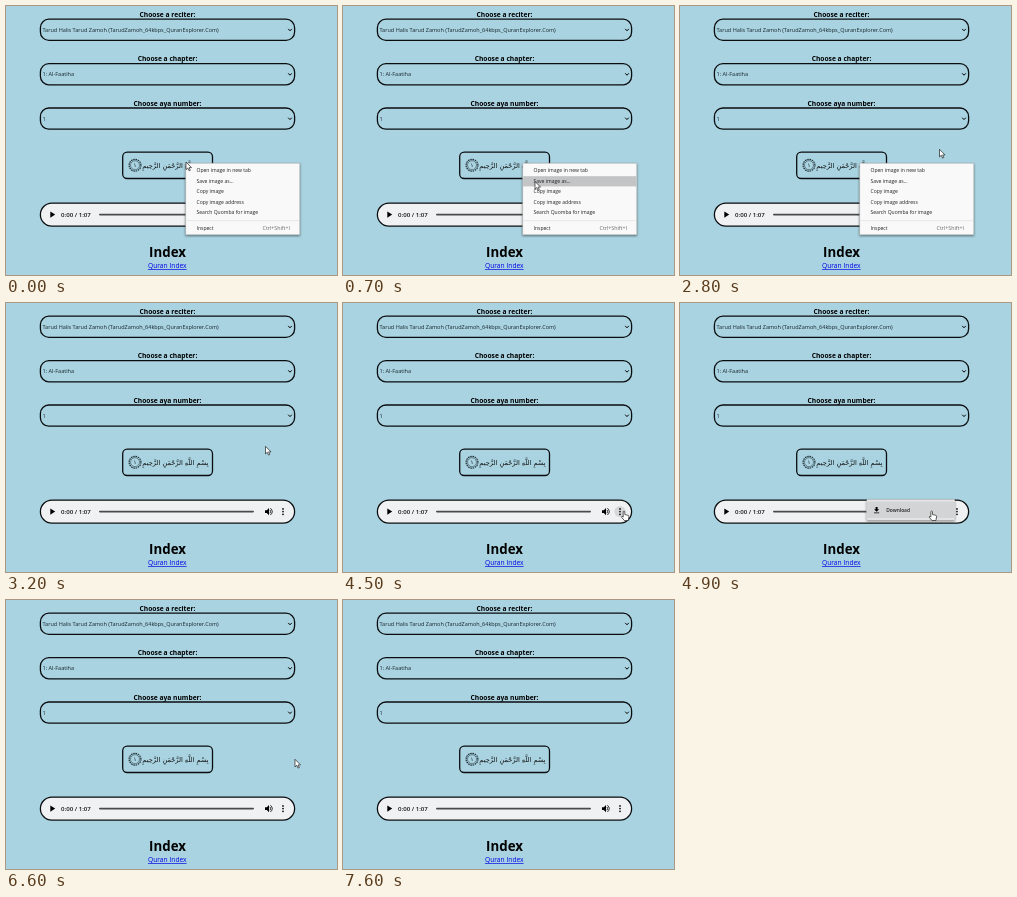
An HTML page that plays this animation: 331 by 269 pixels, repeating every 7.8 s.

```html
<!DOCTYPE html>
<html lang="en">
<head>
<meta charset="utf-8">
<title>Verse player</title>
<style>
  html, body { margin: 0; width: 100%; height: 100%; overflow: hidden; background: #a9d3e1; }
  svg { display: block; width: 100vw; height: 100vh; font-family: "Open Sans", "Noto Sans", sans-serif; }
  text { fill: #111; }
  .box { fill: none; stroke: #0a0d0f; stroke-width: 1.3; }
  .label { font-size: 6.7px; font-weight: 700; text-anchor: middle; fill: #000; }
  .value { font-size: 5.53px; fill: #17252b; }
  .title { font-size: 13.3px; font-weight: 700; text-anchor: middle; fill: #000; }
  .link { font-size: 6.7px; text-anchor: middle; fill: #0000e4; text-decoration: underline; }
  .verse { font: 6.6px "DejaVu Sans", sans-serif; text-anchor: middle; }
  .clock { font-size: 6.1px; font-weight: 600; }
  .item { font-size: 5.05px; fill: #222; }
  .keys { font-size: 5.3px; text-anchor: end; fill: #666; }
  .shadow { filter: drop-shadow(.8px 1px 1px rgba(0, 0, 0, .5)); }
  .pointer { fill: #fff; stroke: #111; stroke-width: .65; stroke-linejoin: round; }
</style>
</head>
<body>
<svg viewBox="0 0 331 269" preserveAspectRatio="none">
  <g id="fields"></g>

  <rect class="box" x="116.7" y="146.2" width="89.8" height="26.3" rx="4.5"/>
  <g fill="none" stroke="#1c2a30">
    <circle cx="129" cy="159.2" r="5.9" stroke-width="1.2" stroke-dasharray="1.5 .8"/>
    <circle cx="129" cy="159.2" r="4.5" stroke-width=".5"/>
  </g>
  <text class="verse" x="129" y="161.3" style="font-size:5.5px">١</text>
  <text class="verse" x="169.5" y="162" direction="rtl">بِسْمِ اللَّهِ الرَّحْمَنِ الرَّحِيمِ</text>

  <rect class="box" x="34.4" y="197.2" width="254.2" height="23" rx="11.5" style="fill:#eff1f2"/>
  <path d="M44.3 205.4V211.8L49.2 208.6Z"/>
  <text class="clock" x="55" y="210.7">0:00 / 1:07</text>
  <rect x="93" y="207.7" width="155" height="1.7" rx=".8" fill="#4a4a4a"/>
  <path d="M259 207.2H260.8L263 205V212.2L260.8 210H259Z"/>
  <path d="M264 206.9Q265.2 208.6 264 210.3M264.4 205.2Q268.2 208.6 264.4 212" fill="none" stroke="#000" stroke-width=".8"/>
  <circle id="hover" cx="277" cy="208.6" r="5.6" fill="#d5d7d8"/>
  <g><circle cx="277" cy="205.9" r=".85"/><circle cx="277" cy="208.6" r=".85"/><circle cx="277" cy="211.3" r=".85"/></g>

  <text class="title" x="161.5" y="250.8">Index</text>
  <text class="link" x="161.3" y="262.2">Quran Index</text>

  <g id="menu">
    <rect class="shadow" x="179.8" y="157.2" width="114" height="71.6" fill="#f9f9fa" stroke="#b4b7b9" stroke-width=".6"/>
    <rect id="row" x="180.1" width="113.4" height="10.2" fill="#c3c4c5"/>
    <g id="items"></g>
    <path d="M180.2 214.6H293.4" stroke="#dcdcdc" stroke-width=".6"/>
    <text class="item" x="190.5" y="224.2">Inspect</text>
    <text class="keys" x="284" y="224.2">Ctrl+Shift+I</text>
  </g>

  <g id="popup">
    <rect class="shadow" x="186.6" y="196.2" width="88.2" height="21" rx=".8" fill="#e2e3e4"/>
    <rect x="186.6" y="198.6" width="88.2" height="16.4" fill="#d3d4d5"/>
    <path d="M195.6 204H197.6V206.2H199.1L196.6 208.7 194.1 206.2H195.6ZM194 209.4H199.2V210.3H194Z"/>
    <text class="item" x="206.2" y="208.8" style="font-weight:600;font-size:4.9px">Download</text>
  </g>

  <g id="cursor" class="pointer">
    <path id="arrow" d="M0 0V7.6L1.8 6 3 8.8 4.3 8.2 3.1 5.6H5.5Z"/>
    <path id="hand" d="M-.8.6Q0-.5.8.6V3.6L4.2 4.3Q5 4.6 4.9 5.6L4.3 9.5H.3L-2.4 6.2Q-2.4 5.1-1.4 5.5L-.8 6.1Z"/>
  </g>
</svg>
<script>
const LOOP = 7800, STEP = 100, ROW_TOP = 159.7, ROW = 10.5;
const $ = id => document.getElementById(id);
const show = (id, on) => $(id).style.display = on ? '' : 'none';

$('fields').innerHTML = [
  ['Choose a reciter:', 'Tarud Halis Tarud Zamoh (TarudZamoh_64kbps_QuranExplorer.Com)'],
  ['Choose a chapter:', '1: Al-Faatiha'],
  ['Choose aya number:', '1']
].map(([label, value], i) => `<g transform="translate(0 ${i * 44.4})">
  <text class="label" x="161.5" y="10.8">${label}</text>
  <rect class="box" x="34.4" y="13.2" width="254.2" height="21.2" rx="8.5"/>
  <text class="value" x="36.5" y="25.9">${value}</text>
  <path d="M282.2 22.9L284 24.8 285.8 22.9" fill="none" stroke="#000" stroke-width="1"/>
</g>`).join('');

$('items').innerHTML = ['Open image in new tab', 'Save image as...', 'Copy image', 'Copy image address', 'Search Quomba for image']
  .map((s, i) => `<text class="item" x="190.5" y="${166.3 + i * ROW}">${s}</text>`).join('');

// Pointer stops: time, x, y
const stops = [
  [0, 180, 156], [100, 180, 156], [400, 186, 167], [500, 186, 167],
  [700, 192, 175.5], [2200, 192, 175.5], [2300, 215, 166], [2800, 259.5, 143.3],
  [3500, 259.5, 143.3], [3800, 271, 203], [3900, 271, 203], [4000, 280, 207],
  [4200, 281, 208], [4700, 281, 208], [5000, 248, 208], [6100, 248, 208],
  [6600, 289, 159.3], [LOOP, 289, 159.3]
];

function pointer(t) {
  const i = stops.findIndex(s => s[0] > t);
  const [t0, x0, y0] = stops[i - 1], [t1, x1, y1] = stops[i];
  const k = 1 - (1 - (t - t0) / (t1 - t0)) ** 2;
  return [x0 + (x1 - x0) * k, y0 + (y1 - y0) * k];
}

function draw(t) {
  const [x, y] = pointer(t);
  const onHand = t >= 4000 && t < 6300;
  $('cursor').setAttribute('transform', `translate(${x} ${y})`);
  show('cursor', t < 7000);
  show('arrow', !onHand);
  show('hand', onHand);

  // The menu highlight trails the pointer by one step
  const row = Math.floor((pointer(Math.max(0, t - STEP))[1] - ROW_TOP) / ROW);
  show('menu', t < 3200);
  show('row', row >= 0);
  $('row').setAttribute('y', ROW_TOP + row * ROW);

  show('hover', t >= 4200 && t < 4800);
  show('popup', t >= 4700 && t < 6400);
  $('popup').style.opacity = t < 4800 ? .6 : t < 6200 ? 1 : t < 6300 ? .7 : .3;
}

const start = performance.now();
function tick() {
  const t = Math.max(0, performance.now() - start) % LOOP;
  draw(Math.floor(t / STEP) * STEP);
  requestAnimationFrame(tick);
}
tick();
</script>
</body>
</html>
```
